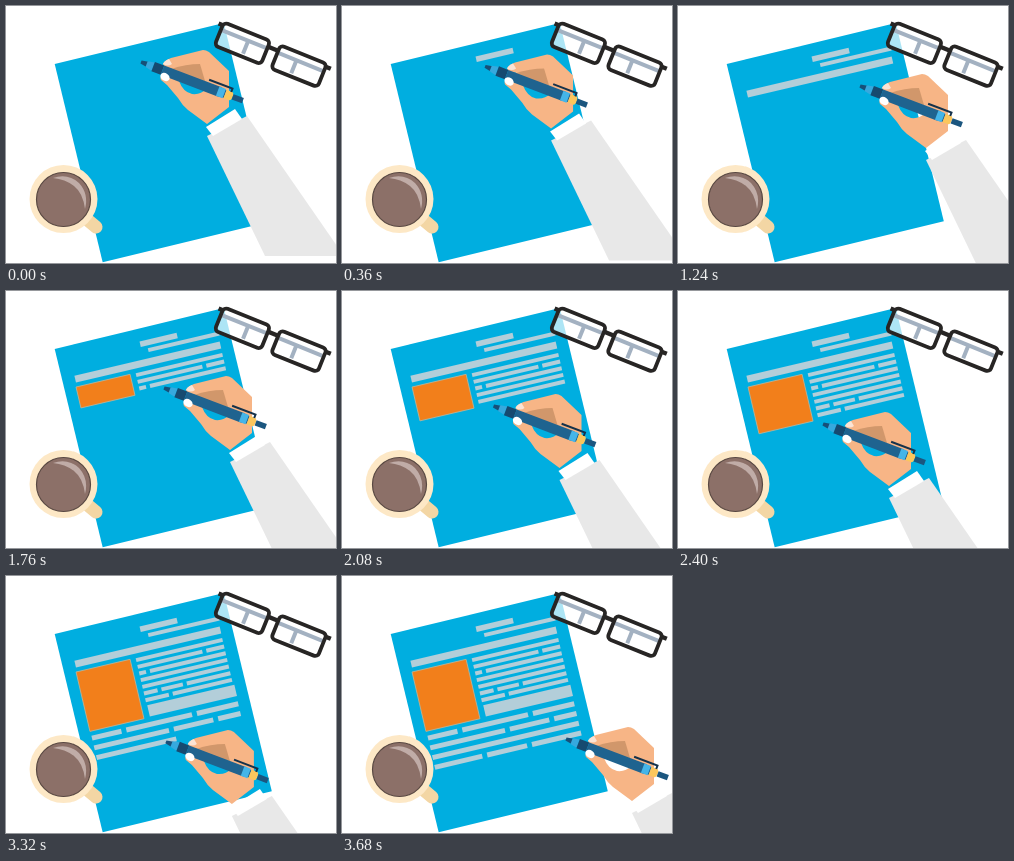
Write an HTML page that moves like this. It is 330 by 257 pixels and loops after 8000 ms.

```html
<!DOCTYPE html>
<html lang="en">
<head>
<meta charset="utf-8">
<title>Writing hand</title>
<style>
  html, body { margin: 0; width: 100%; height: 100%; overflow: hidden; background: #fff; }
  svg { display: block; width: 330px; height: 257px; }
</style>
</head>
<body>
<svg viewBox="0 0 330 257">
  <rect width="174" height="204" transform="translate(48.7 58) rotate(-13.6)" fill="#00aee0"/>
  <g transform="translate(49 58) rotate(-13.2)">
    <g id="rows" fill="#b3ced9"></g>
    <rect id="photo" x="11.8" y="41.8" width="55.5" fill="#f27f1b" stroke="#b9b59a" stroke-width=".8"/>
  </g>

  <!-- glasses -->
  <g transform="translate(266 45.5) rotate(22)">
    <g fill="#fff" fill-opacity=".68">
      <rect id="lens" x="5.5" y="-9" width="50" height="25" rx="4"/>
      <use href="#lens" transform="scale(-1 1)"/>
    </g>
    <path d="M-54-1H-7M7-1H54M-26-1V13M26-1V13" fill="none" stroke="#a3b1c1" stroke-width="4"/>
    <g fill="none" stroke="#272524" stroke-width="3.8">
      <use href="#lens"/>
      <use href="#lens" transform="scale(-1 1)"/>
      <path d="M-60-6H-56M56-6H61M-6-3H6" stroke-width="4.4"/>
    </g>
  </g>

  <!-- coffee -->
  <path d="M78 211L90 221" stroke="#f3d6a4" stroke-width="13" stroke-linecap="round"/>
  <circle cx="57.5" cy="193" r="34" fill="#fde8c6"/>
  <circle cx="57.5" cy="193.5" r="27" fill="#8c7068" stroke="#594842" stroke-width="1.2"/>
  <path d="M47 172Q62 167 73 177Q83 188 79 203Q77 187 68 180Q59 173 47 172Z" fill="#c0aca7"/>

  <g id="hand">
    <path d="M66 74L106 54L203 194H124Z" fill="#e8e8e8"/>
    <path d="M65 65L94 47L101 57L72 74Z" fill="#fff"/>
    <path fill="#f7b586" fill-rule="evenodd" d="M22 2Q24-2 30-4L62-12Q65-12 68-10L88 9V45L66 62L47 48Q41 43 37 36L26 23L20 18Q18 14 23 12L31 6Q24 7 22 2Z
      M38 19L65 27Q60 33 51 32Q42 30 38 19Z"/>
    <path d="M30 7Q45 2 59 2L64 19L38 13Z" fill="#d1976b"/>
    <path d="M22 2Q23-1 28-3L31 2Q27 5 22 2Z" fill="#fbe3d4"/>
    <g transform="rotate(20.8)">
      <path d="M0-1.5L7-2.8V2.8L0 1.5Z" fill="#174f78"/>
      <path d="M6-3L13-4.5V4.5L6 3Z" fill="#36a9de"/>
      <path d="M13-5H23V5H13Z" fill="#164a70"/>
      <path d="M23-5H83L90-4V4L83 5H23Z" fill="#1f638f"/>
      <path d="M82-5H89V5H82Z" fill="#45b5e8"/>
      <path d="M90-4.5H96Q98-4 98 0T96 4.5H90Z" fill="#fbc65c"/>
      <path d="M98-2.8H109V2.8H98Z" fill="#1b567f"/>
      <path d="M70-7.6H95V-4" fill="none" stroke="#15324b" stroke-width="2"/>
    </g>
    <ellipse cx="24" cy="15" rx="5" ry="3.8" transform="rotate(35 24 15)" fill="#fff"/>
  </g>
</svg>
<script>
const $ = id => document.getElementById(id);
const clamp = x => Math.min(1, Math.max(0, x));

const bars = [];
// A row is centred on y and written from left to right, broken at the gaps
function addRow(y, height, left, right, start, duration, gaps = [], gap = 0) {
  const edges = [left - gap / 2, ...gaps, right + gap / 2];
  for (let i = 1; i < edges.length; i++) {
    const el = document.createElementNS("http://www.w3.org/2000/svg", "rect");
    const from = edges[i - 1] + gap / 2, to = edges[i] - gap / 2;
    el.setAttribute("x", from);
    el.setAttribute("y", y - height / 2);
    el.setAttribute("height", height);
    $("rows").append(el);
    bars.push({ el, from, to, left, right, start, duration });
  }
}

addRow(14.8, 5.5, 84, 122, 40, 240);
addRow(22.4, 4, 90.5, 163.5, 680, 160);
addRow(33.9, 7, 12.8, 162, 860, 240);
[[], [141.5], [82], [], [], [89], [99]].forEach((gaps, i) => {
  if (i === 5) gaps.push(115);
  addRow(44 + 6.85 * i, 4, 73, 161.8, 1280 + 160 * i, 150, gaps, 4);
});
addRow(96.2, 11.5, 73.5, 163, 2420, 220);
[[45, 117.5], [91.5, 137], [], [63.5, 109.5]].forEach((gaps, i) =>
  addRow(109.8 + 10 * i, 5, 12.2, 162.5, 2680 + 260 * i, 220, gaps, 5));

// Pen tip: ms, x, y, and how often it swings along the row before the next pose
const poses = [
  [0, 135, 56, .5], [680, 75, 82, 0], [840, 71, 88, .5], [1240, 182, 80, -3],
  [1760, 158, 97, -4], [2400, 145, 133, 2], [2920, 166, 151, -2.5], [3680, 224, 163, 0]
];

function penAt(t) {
  const i = poses.findLastIndex(p => p[0] <= t);
  const [t0, x0, y0, swings] = poses[i];
  const [t1, x1, y1] = poses[i + 1] || [8000, x0, y0];
  const k = (t - t0) / (t1 - t0);
  const swing = 40 * Math.sin(2 * Math.PI * swings * k);
  return [x0 + (x1 - x0) * k + swing, y0 + (y1 - y0) * k - .235 * swing];
}

function draw(now) {
  const t = Math.floor(now % 8000 / 40) * 40;
  for (const b of bars) {
    const front = b.left + (b.right - b.left) * clamp((t - b.start) / b.duration);
    b.el.setAttribute("width", Math.max(0, Math.min(front, b.to) - b.from));
  }
  const shown = clamp((t - 1240) / 1473);
  $("photo").setAttribute("height", 61 * shown);
  $("photo").setAttribute("visibility", shown ? "visible" : "hidden");
  $("hand").setAttribute("transform", `translate(${penAt(t)})`);
}

const begin = performance.now();
function tick() {
  draw(performance.now() - begin);
  requestAnimationFrame(tick);
}
tick();
</script>
</body>
</html>
```
